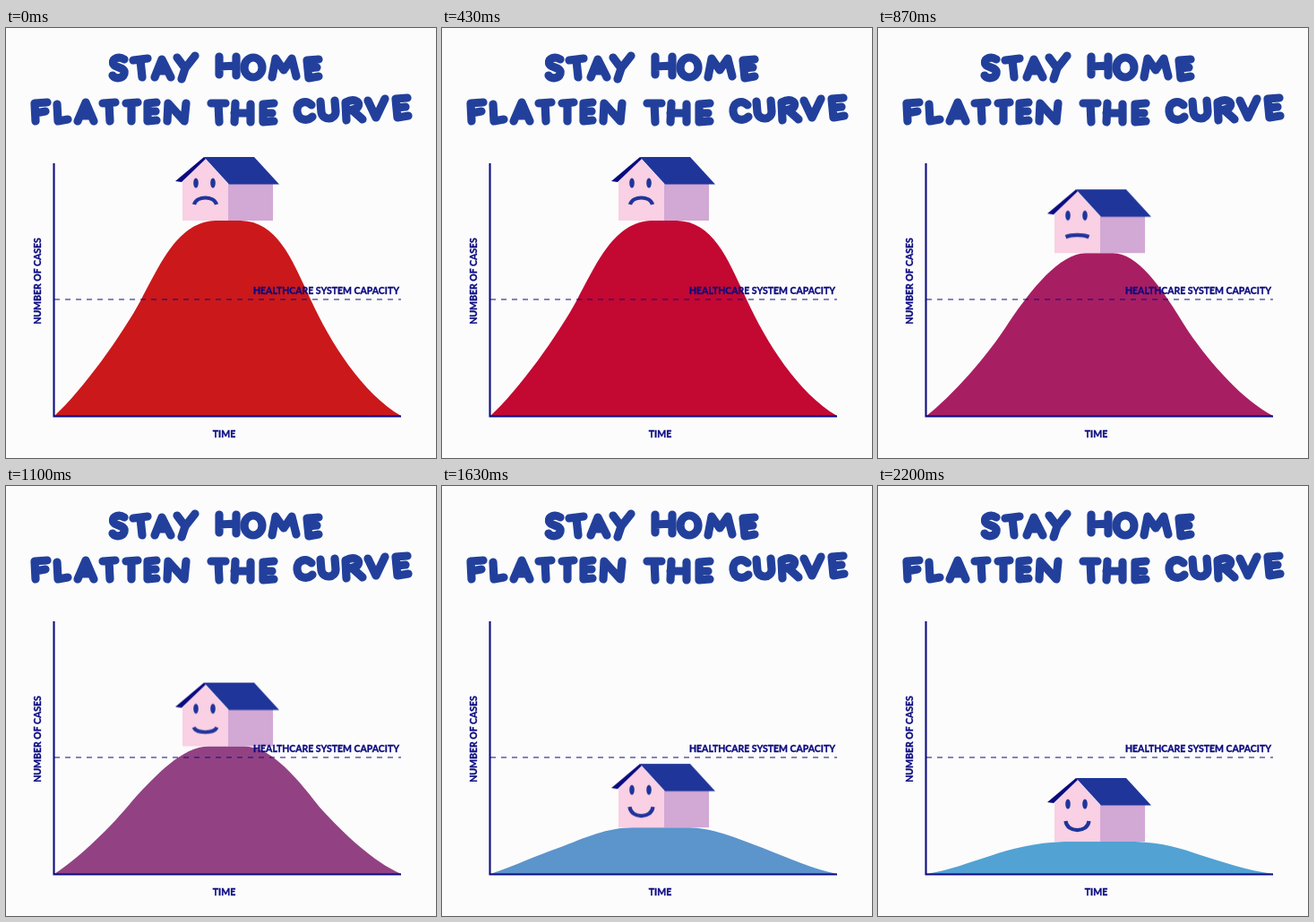
Animation of 480 by 480 pixels, one loop 2230 ms. Source, as an HTML page:

```html
<!DOCTYPE html>
<html lang="en">
<head>
<meta charset="utf-8">
<title>Stay home, flatten the curve</title>
<style>
  :root {
    --loop: 2230ms;
    --navy: #0b0b80;
    --blue: #20359a;
  }
  html, body { margin: 0; width: 100%; height: 100%; overflow: hidden; background: #fcfcfc; }
  svg { display: block; width: 100%; height: 100%; }

  .title {
    fill: none; stroke: #22409b; stroke-width: 9.2;
    stroke-linecap: round; stroke-linejoin: round;
  }
  .labels {
    font: 700 10.5px Lato, "Open Sans", sans-serif;
    fill: var(--navy); stroke: var(--navy); stroke-width: .35;
  }
  .axes { fill: none; stroke: var(--navy); stroke-width: 2.1; }
  .limit { stroke: var(--navy); stroke-width: 1.1; stroke-dasharray: 6 6; }

  .hill { animation: flatten var(--loop) infinite linear, cool var(--loop) infinite linear; }
  .house { animation: lower var(--loop) infinite linear; }
  .mouth {
    fill: none; stroke: var(--blue); stroke-width: 4.2;
    animation: cheer var(--loop) infinite linear;
  }

  /* accelerate, sink steadily, settle */
  @keyframes lower {
    0% { transform: translateY(0); }
    20.2% { transform: translateY(0); animation-timing-function: cubic-bezier(.333, 0, .667, .333); }
    39% { transform: translateY(36px); }
    73.1% { transform: translateY(166px); animation-timing-function: cubic-bezier(.333, .667, .667, 1); }
    81.6%, 100% { transform: translateY(182px); }
  }
  @keyframes flatten {
    0%, 20.2% {
      d: path("M54 433 C85 405 130 342 151 303 C172 264 192 216 234 215 L262 215 C302 216 318 255 340 303 C362 351 398 408 441 433 Z");
      animation-timing-function: cubic-bezier(.333, 0, .667, .333);
    }
    39% {
      d: path("M54 433 C82 411 122 367 147 327 C172 291 202 252 232 251 L262 251 C290 252 314 285 346 338 C372 376 408 416 441 433 Z");
    }
    73.1% {
      d: path("M54 433 C82 424 106 412 130 404 C160 392 185 381 213 381 L275 381 C300 381 330 393 358 404 C388 416 415 428 441 433 Z");
      animation-timing-function: cubic-bezier(.333, .667, .667, 1);
    }
    81.6%, 100% {
      d: path("M54 433 C80 429 102 420 125 413 C148 405 175 398 208 397 L287 397 C318 398 340 405 360 412 C385 420 412 429 441 433 Z");
    }
  }
  @keyframes cool {
    0% { fill: #cb181b; }
    19.3% { fill: #c30832; }
    39% { fill: #a81e62; }
    59.6% { fill: #7c66a4; }
    73.1% { fill: #5c94cc; }
    83.9%, 100% { fill: #52a2d4; }
  }
  @keyframes cheer {
    0%, 22% { d: path("M210 197 C213 187 232 187 235 197"); }
    39% { d: path("M209.5 197 C216 194 229 194 235.5 197"); }
    56%, 100% { d: path("M209.5 192 C211 205.5 234 205.5 235.5 192"); }
  }
</style>
</head>
<body>
<svg viewBox="0 0 480 480">
  <g class="title" role="img" aria-label="Stay home, flatten the curve">
    <!-- STAY -->
    <path d="M132 35 C126 31 119 34 119.500 39 C120 45 134 43 132 51 C130 57 122 57 119 53"/>
    <path d="M142 36 L158 34 M150 36 L152 55"/>
    <path d="M166 55 L174 35 L184 55 M170 48 L179 48"/>
    <path d="M191 33 L200 45 L211 31 M200 45 L196 57"/>
    <!-- HOME -->
    <path d="M238 32 L238 52 M257 32 L257 53 M238 43 L257 42"/>
    <ellipse cx="276" cy="44" rx="10" ry="11"/>
    <path d="M297 55 L301 34 L310 47 L319 34 L324 54"/>
    <path d="M349 35 L336 36 L338 56 L349 54 M337 45 L347 44"/>
    <!-- FLATTEN -->
    <path d="M46 83 L32 84 L33 104 M33 95 L44 93"/>
    <path d="M57 85 L58 104 L69 102"/>
    <path d="M80 104 L89 83 L98 104 M84 98 L94 98"/>
    <path d="M108 84 L122 83 M115 84 L116 104"/>
    <path d="M134 84 L147 83 M140 84 L140 104"/>
    <path d="M168 83 L158 84 L158 104 L168 103 M158 93 L167 93"/>
    <path d="M180 104 L181 84 L199 104 L201 84"/>
    <!-- THE -->
    <path d="M229 84 L245 84 M237 84 L238 105"/>
    <path d="M256 84 L255 105 M273 85 L273 105 M255 95 L273 95"/>
    <path d="M299 84 L287 85 L287 105 L299 104 M287 95 L297 95"/>
    <!-- CURVE -->
    <path d="M341 86 C334 79 324 84 325 93 C326 104 337 104 342 99"/>
    <path d="M351 82 L352 94 C354 104 368 103 368 93 L367 81"/>
    <path d="M380 103 L379 83 C390 77 398 84 391 90 L380 93 M388 93 L398 102"/>
    <path d="M404 81 L413 100 L423 79"/>
    <path d="M448 78 L435 79 L437 100 L449 98 M436 89 L446 88"/>
  </g>

  <path class="hill"/>

  <g class="house">
    <path fill="#f9d0e4" d="M197 215 V172 L222 146 L248 174 V215 Z"/>
    <path fill="#d2a8d5" d="M248 173 H298 V215 H248 Z"/>
    <path fill="#20359a" d="M221 144 H277 L305 174.500 H249 Z"/>
    <path fill="#0b0b80" d="M189 171 L221 144 L223 146 L196 172 Z"/>
    <g fill="#20359a">
      <ellipse cx="212" cy="173" rx="2.800" ry="5.500"/>
      <ellipse cx="231" cy="173" rx="2.800" ry="5.500"/>
    </g>
    <path class="mouth"/>
  </g>

  <path class="axes" d="M53.500 151 V433.500 H441"/>
  <path class="limit" d="M54 303 H441"/>
  <g class="labels">
    <text x="439" y="296.500" text-anchor="end">HEALTHCARE SYSTEM CAPACITY</text>
    <text x="243.500" y="457" text-anchor="middle">TIME</text>
    <text transform="translate(39 282.500) rotate(-90)" text-anchor="middle">NUMBER OF CASES</text>
  </g>
</svg>
</body>
</html>
```
